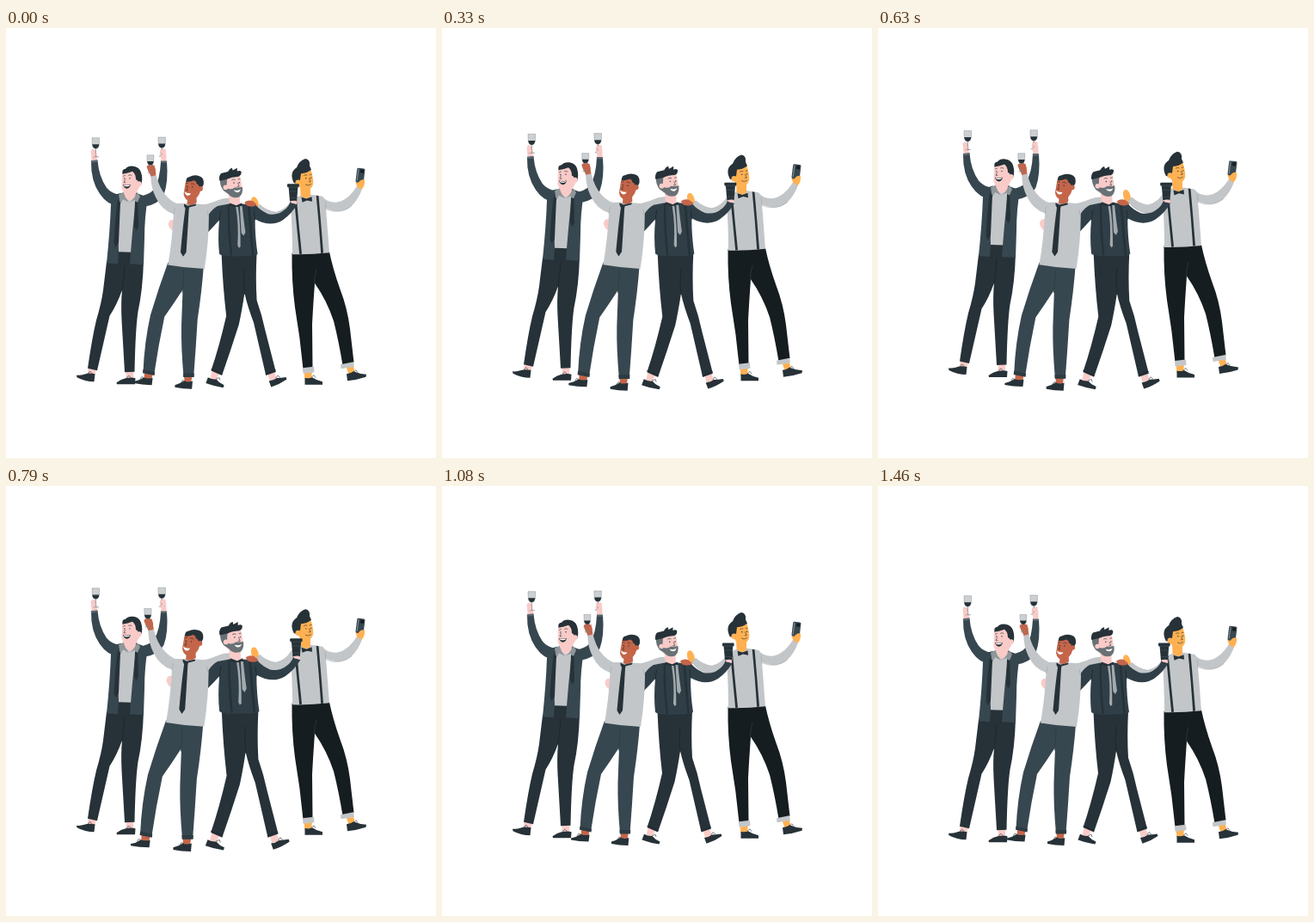
An HTML page for the animation above (1.5 s loop, 500 by 500 pixels).

```html
<!DOCTYPE html>
<html lang="en">
<head>
<meta charset="utf-8">
<title>Friends celebrating</title>
<style>
html, body { margin: 0; width: 100%; height: 100%; overflow: hidden; background: #fff; }
svg { display: block; width: 100vw; height: 100vh; }
.ink { fill: #263238; }
.slate { fill: #37474f; }
.dusk { fill: #303f47; }
.black { fill: #161d21; }
.cloth { fill: #c3c6c9; }
.rose { fill: #f9cbc8; }
.brown { fill: #c4654a; }
.amber { fill: #ffb152; }
.white { fill: #fff; }
.line { fill: none; stroke: #263238; stroke-width: .6; stroke-linecap: round; }
.fold { fill: none; stroke: #1b2429; stroke-width: .8; stroke-linecap: round; }
.lace { fill: none; stroke: #263238; stroke-width: .6; }
.seam { fill: none; stroke: #969da1; stroke-width: .5; }
</style>
</head>
<body>
<svg viewBox="0 0 500 500">
<defs>
  <g id="glass">
    <path fill="#cdd0d2" stroke="#8b9296" stroke-width=".5" d="M-4.3 0H4.3L4 8Q3.4 12.4 0 12.6Q-3.4 12.4-4 8Z"/>
    <path class="ink" d="M-4 7.6H4Q3.4 12.4 0 12.6Q-3.4 12.4-4 7.6Z"/>
    <path fill="none" stroke="#7b8489" stroke-width=".8" d="M0 12.5V21.600M-3.4 22H3.4"/>
  </g>
</defs>

<g class="float">
  <!-- man with open jacket -->
  <path class="rose" d="M95.500 396L105 397L103 405L95 404Z"/>
  <path class="rose" d="M139.500 398H148.500L148 409H140Z"/>
  <path class="ink" d="M82 404Q87 404.500 91 403Q96 401 103.500 402.500L102.500 411.500Q92 411.500 82.500 406.500Z"/>
  <path class="ink" d="M128.500 412.500Q134 408.500 139 407.500Q146 406 150.500 407.500L150 414.500H129Z"/>
  <path class="lace" d="M95 402l3-2.500l2 2.500M140 407l3-2.500l2 2"/>
  <path class="ink" d="M117 272L130 258H148L160 271Q159 305 153.500 330Q150.500 350 149.500 400L138 400.500L134.500 340Q133.500 320 135 305Q129 322 120.500 335Q113 368 106 398.500L95 396Q100 361 105 340Q111 320 113 305Z"/>
  <path class="fold" d="M138 277Q137 292 135 306"/>
  <path class="cloth" d="M129 196L137 191L153 192L155 200L146 261L131 260.500Z"/>
  <path class="rose" d="M138 186L153 183L152 194Q149 199 144 201Q138 198 136 193Z"/>
  <path class="rose" d="M99 143Q99 140.500 101.500 141L104.500 142.500Q106 148 106 156L99.500 157Z"/>
  <path class="rose" d="M179 148Q178 142 181 140.500L185.500 141Q187 148 186.500 156.500L180 157Q181 152 179 148Z"/>
  <use href="#glass" x="104.300" y="128"/>
  <use href="#glass" x="181.200" y="127.300"/>
  <path class="rose" d="M98.500 144Q99 142 102 143.500L104.500 147L103 150H99.500ZM179.500 142.500L184 141L186 146L184 151L179 149.500L182 147Z"/>
  <path class="slate" d="M99 155.500L106.500 154.500Q108 173 117 186Q122 192 131 194L130 207Q118 206 109 193Q98.500 178 99 155.500Z"/>
  <path class="slate" d="M180 155.500L187 155.500Q189 179 183.500 194Q178 205 161 208L153 196Q166 195 172 188Q179 177 180 155.500Z"/>
  <path fill="#58676f" d="M98.800 154.500L106.500 153.500L106.700 156L99 157ZM179.800 154.700H187L187.100 157H180Z"/>
  <path class="slate" d="M123 195L134 192Q130 215 131 260L130 274.500L117 273.500Q121 235 122 205Z"/>
  <path class="slate" d="M151 192L165 197Q161 220 161 245L160 275.500L144 274.500Q147 235 150 208Z"/>
  <path fill="#8f979b" d="M131 194L136.500 191Q138 197 143 203L136 199.500L133 205ZM152.500 191L156 196L152.500 204L149.500 200L144 203Q150 198 152.500 191Z"/>
  <path class="ink" d="M130 200L133 203Q132 225 131 250L127.500 255.500L125.500 250Q127 220 130 200ZM150 202L153.200 203L154 231L151.500 236L149 231Z"/>
  <path class="rose" d="M135 169Q144 163 154 168L156 183Q153 193 144 194.500Q136 194 134.500 186Z"/>
  <path class="ink" d="M135.500 170Q134.300 164.500 139 164Q142 160.300 148 161Q155 162 157 168Q159.500 176 157 183L153.500 181Q154 177 151 176.500Q151 170 147 167Q142 169 135.500 170Z"/>
  <circle class="rose" cx="154.700" cy="181.500" r="3"/>
  <path class="ink" d="M136 182Q140.500 184 144.800 182Q144.500 186.500 140.500 187Q137 186.500 136 182Z"/>
  <path class="white" d="M136.800 182.500Q140.500 184.300 144.300 182.500L143.500 184Q140 185.300 137.300 184Z"/>
  <path class="line" d="M136.500 172.500l2-.8M142.500 171.500q2-1.200 3.500 .2M138.500 176.500l-1.500 3.500h2"/>
  <circle class="ink" cx="137.800" cy="175.200" r=".7"/><circle class="ink" cx="144" cy="175" r=".7"/>

  <!-- man with phone -->
  <path class="amber" d="M346.500 399H356L355 409H347.500ZM395.500 394L403.500 392L406 402L398.500 403Z"/>
  <path class="ink" d="M347.500 407Q352 408.500 356 406.500Q361 410 368 411.500L368 415H347.500ZM396 402.500Q401 402 404 399.500Q411 402.500 419 403L418.500 406Q408 409.500 397 410.500Z"/>
  <path class="lace" d="M355 406.500l3-2.500l2 3M404 400.500l3-2.500l2 3"/>
  <path class="black" d="M332.500 262L376 260.500Q380 280 388.500 304Q397 326 400 350L404.500 389L391.500 392.500Q387 365 381 341Q373 317 359 297Q357 325 356 345L356.500 396L345.500 397Q342 360 336 325Q332 295 332.500 262Z"/>
  <path class="fold" style="stroke:#303a40" d="M361 281Q358 289 358.500 299"/>
  <path class="cloth" d="M345 395.500L358 394L358.500 400.500L345.500 402ZM389 391.500L404 388.500L405 394L389.500 396.500Z"/>
  <path class="amber" d="M294 208Q294 201 290 197Q286 195.500 285 200Q284.500 206 288 210L297 214Z"/>
  <path class="cloth" stroke="#969da1" stroke-width=".4" d="M332 201Q325 212 314 214.500Q303 213 295 205.500L290.500 210Q299 222 313 224Q323 223 333 213Z"/>
  <path class="cloth" d="M330.500 203Q332 198 343 195L355 194L368 196Q373 203 383 203Q397 202 408.500 183.500L414 187.500Q410 199 402 207Q390 218 372 210Q374 235 376 261.500Q354 264 333 263.500Q333 230 330.500 203Z"/>
  <path class="seam" d="M371 202L372 211Q388 218 402 207"/>
  <path class="ink" d="M335 199L337.800 198Q340.500 230 344 263L341.200 263.300Q338 230 335 199ZM360.700 195L363.500 195.500Q366.500 230 369 261.800L366.200 262.200Q364 228 360.700 195Z"/>
  <path class="amber" d="M342 183L354 186L354 196L349 199L342.500 195.500Z"/>
  <path class="ink" d="M343.500 197L349.300 198.800L355.500 196.500L356 202L350 200.800L344.500 203Z"/>
  <path class="amber" d="M340 168L354 164Q357.300 173 357.300 181Q356 188 349 188.500Q342 188 340 183Z"/>
  <path class="ink" d="M334.500 180Q329 168 338 162.500Q341 154.500 348 152.300Q354 153 353 160.500L355 165Q350 169 343 169.500L342 177L340 180Q337 182 334.500 180Z"/>
  <circle class="amber" cx="339.700" cy="180" r="3.200"/>
  <circle class="ink" cx="348.800" cy="175" r=".7"/><circle class="ink" cx="354.500" cy="174.500" r=".7"/>
  <path class="line" d="M346.500 171.700q2-1.400 3.500-.3M353 171l2-.5M352.500 175l1.700 4h-2M348.500 182.500Q351.500 184.500 354.500 182"/>
  <path class="amber" d="M406.500 180Q408 176 412 175L417 177Q417.500 184 413.500 188L408.500 185Z"/>
  <g transform="rotate(7 412 172)">
    <rect class="slate" x="407.300" y="163.300" width="9.300" height="17" rx="1.600"/>
    <rect fill="#87929a" x="408.500" y="164.500" width="1" height="14"/>
    <rect class="black" x="411.300" y="164.700" width="4" height="4" rx="1"/>
  </g>
  <path class="amber" d="M409.500 180.500Q412 176 416.500 176.500L417 181L412 184Z"/>
</g>

<g class="beat">
  <path class="rose" d="M196 224Q190 223 189.500 229Q190.500 235 196 237Z"/>
  <!-- man with coffee -->
  <path class="rose" d="M239.500 397L248 400L244.500 408.500L237.500 406ZM303.500 400L311.500 398.500L314 406.500L306 409Z"/>
  <path class="ink" d="M235 404.800Q240 407.500 244.500 407Q248 411.500 253.500 413.500L252.500 416.500Q242 415 232.500 411.500ZM305 409Q310 408.500 314 405.500Q319 405.500 324.500 404.500L325.500 407Q317 413 307.500 415.800Z"/>
  <path class="lace" d="M244 407l4-2l1 3M313 405.500l2-3l3 2.500"/>
  <path class="ink" d="M250.500 262H291Q289.500 290 291 316Q297 333 301 352L313 398.500L301.500 402.500Q294 370 287.500 342Q280 322 277 308Q274 328 270.500 344Q261 374 251 402.500L238.500 397Q248 369 256 334Q252 300 250.500 262Z"/>
  <path class="fold" d="M277 280Q275 295 277 309M239 395.500L251 400.500M301.500 400.500L312.500 396.500"/>
  <path class="cloth" d="M224 208Q238 205 247 201Q255 198 262 199V211H248Q241 216 235 223Z"/>
  <path class="dusk" d="M246 208L259 205.500L275 205.500L290 207Q295 213 304 217Q315 219 322 213Q328 209 330 202L337.500 206Q331 217 321 224Q307 233 289 223Q289 244 292 263Q289 266 270 265.500Q252 266.500 248 263Q246 245 248 224Q242 231 235 238L228 234Q235 214 246 208Z"/>
  <path class="fold" d="M248 225L249.500 214M289 224L288 214"/>
  <path class="rose" d="M258.500 193L271 194.500L272 205L267 208L259.500 205Z"/>
  <path class="ink" d="M257.700 206.500L259.700 206Q260 237 263 265H260.500Q257 236 257.700 206.500ZM280.300 207H283Q285.500 236 288 264.500H285.300Q282.500 235 280.300 207Z"/>
  <path class="ink" d="M260 204.500L268 207.500L273.500 204.500L275 208.500L267 209.500L259.500 207.500Z"/>
  <path fill="#a3aaae" d="M267 209L269.500 209Q272.500 230 272.300 254.500L270.500 256L269 253Q270.500 230 267 209ZM271.500 208L274.300 208Q276 225 278 238L276 242L273.300 239Z"/>
  <path class="brown" d="M277 203.500Q281 200.500 286 202L291 206Q289 209 284 208.500Q279 209 277 203.500Z"/>
  <path class="rose" d="M253 175L271 172Q274 180 274 190Q272 197 264 197Q256 196 254 189Z"/>
  <path fill="#697176" d="M249 177L257 175L256.500 184L258 188Q263 189.500 266 186.500Q271 187 274.500 186Q275.500 194 271 197.500Q263 200 258.500 194L253 190.500Q248 184 249 177Z"/>
  <circle class="rose" cx="255.200" cy="186.500" r="2.800"/>
  <path class="ink" d="M248.300 179Q247 174 250 170.500Q254 169.500 258 168.500Q259 165.500 262.500 164L263.500 167L268.500 164.300L268.500 168Q271.500 166.500 273.300 168.500Q273.500 173 270 174Q262 174.500 257 177Z"/>
  <path class="white" d="M264.500 189.500Q268.500 191 272.500 189Q271.500 192.300 268.500 192.300Q265.500 192 264.500 189.500Z"/>
  <circle class="ink" cx="264.800" cy="181.300" r=".7"/><circle class="ink" cx="271" cy="181" r=".7"/>
  <path class="line" d="M262.500 178q2-1.400 3.600-.2M269.700 177.300l2-.5M269.300 181.500l1.500 4h-2"/>
  <path class="rose" d="M328.500 199L337.500 199L337 206L330.500 204Z"/>
  <path class="ink" d="M327.500 185.500H338.300L337 202.500H329Z"/>
  <rect class="ink" x="326" y="182.600" width="13.600" height="3.600" rx=".8"/>
  <path fill="none" stroke="#4a575e" stroke-width=".5" d="M326.700 186.300H339M328 191H338M328.800 198.500H337.400"/>
  <path class="rose" d="M329.500 202.500Q332.500 201.500 336.300 202L336 205.500L330.800 204.500Z"/>

  <!-- man with necktie -->
  <path class="brown" d="M162 399L171.500 401L170 408H161.500ZM207.500 402H217L215.500 411H208Z"/>
  <path class="ink" d="M150 409.500Q156 408.500 161 405Q166 406.500 171.500 405.500L170.500 413.500Q159 413.500 150 411.500ZM197 413.500Q203 412 207.500 408.800Q212 411 217.300 409L216.500 418Q206 418 197 416Z"/>
  <path class="lace" d="M157 407l2-3l3 1.500M204 411l2-3l3 1.500"/>
  <path class="slate" d="M189 273L230 277Q228 305 223 338Q221 372 218.500 404L207 404Q204 371 204.500 345L206 304Q195 321 185 335Q178 368 173 402L160.500 399Q162 364 169 333Q178 303 189 273Z"/>
  <path fill="#2d3b42" d="M160.500 395.500L174 398.500L173.500 402.500L160 399.800ZM206.500 400H219.200L219 404.500H206.700Z"/>
  <path class="fold" style="stroke:#2d3b42" d="M207 282Q207 295 205.500 307"/>
  <path class="brown" d="M164.500 163Q167 160 172 160.500L174.500 165L175.500 174L170 175Z"/>
  <use href="#glass" transform="translate(168.900 149.500) scale(.92)"/>
  <path class="brown" d="M165 161.500L168 160.500L169.500 167L166.500 168.500ZM170 163L173.500 161L174.500 167L171 168Z"/>
  <path class="cloth" d="M169.300 174L175.500 172.500Q179 187 186 195Q192 202 199 205L209 205L222 205.500L236 206.500L236 220Q236 248 231 280Q209 279 189 275.500Q194 247 195.500 217Q182 213 175 198Q169.500 187 169.300 174Z"/>
  <path class="seam" d="M195.500 218L197 210M235.500 220L234 213"/>
  <path class="brown" d="M211.500 198L221.500 193L222 204Q217 208.500 211 206Z"/>
  <path class="ink" d="M207.500 205.500L212 207.700L221.500 205.500L221 207.500L213.500 209.500L213 212Q211.500 240 210 261L206.500 266L203.500 261Q206 232 209 211L207.500 208Z"/>
  <path class="brown" d="M209.500 179Q217 174 226 178L226.500 190Q224 200.500 215 202Q208 201.500 207 194Z"/>
  <path class="ink" d="M210 180Q209.500 175 213.500 174.500Q219 171.500 225 173.500Q231 175 230 183L227.500 188L225 187.500Q225 183 222 182.500Q222 179.500 219 178.500Q214 180.500 210 180Z"/>
  <circle class="brown" cx="226.300" cy="188" r="2.800"/>
  <path class="white" d="M208 191.500Q211.500 194 215.500 193.200Q214.500 196.300 211.500 196Q208.800 195.300 208 191.500Z"/>
  <circle class="ink" cx="211" cy="185.200" r=".7"/><circle class="ink" cx="217" cy="186" r=".7"/>
  <path class="line" d="M210 182l2-.3M215.800 182.300q2-.7 3.500 .9M211.800 186.500l-2 3.500h2"/>
</g>
</svg>
<script>
const LOOP = 1500, STEPS = 36;
const beats = [[0, 1], [.1, 1.09], [.3, 1], [.4, 1], [.5, 1.09], [.6, 1], [1, 1]];
const float = document.querySelector('.float');
const beat = document.querySelector('.beat');

function mix(keys, p) {
  const i = keys.findIndex(k => k[0] >= p);
  if (i < 1) return keys[0][1];
  const [a, u] = keys[i - 1], [b, v] = keys[i];
  return u + (v - u) * (p - a) / (b - a);
}

function draw(ms) {
  // 24 poses a second, each taken at the middle of its step
  const p = (Math.floor((ms + 5) % LOOP / LOOP * STEPS) + .5) / STEPS;
  const rise = 10 * (1 - Math.abs(1 - 2 * p));
  float.setAttribute('transform', `translate(0 ${-rise})`);
  beat.setAttribute('transform',
    `translate(245 283.5) scale(${mix(beats, p)}) translate(-245 -283.5)`);
}

const start = performance.now();
function tick() {
  draw(performance.now() - start);
  requestAnimationFrame(tick);
}
tick();
</script>
</body>
</html>
```
